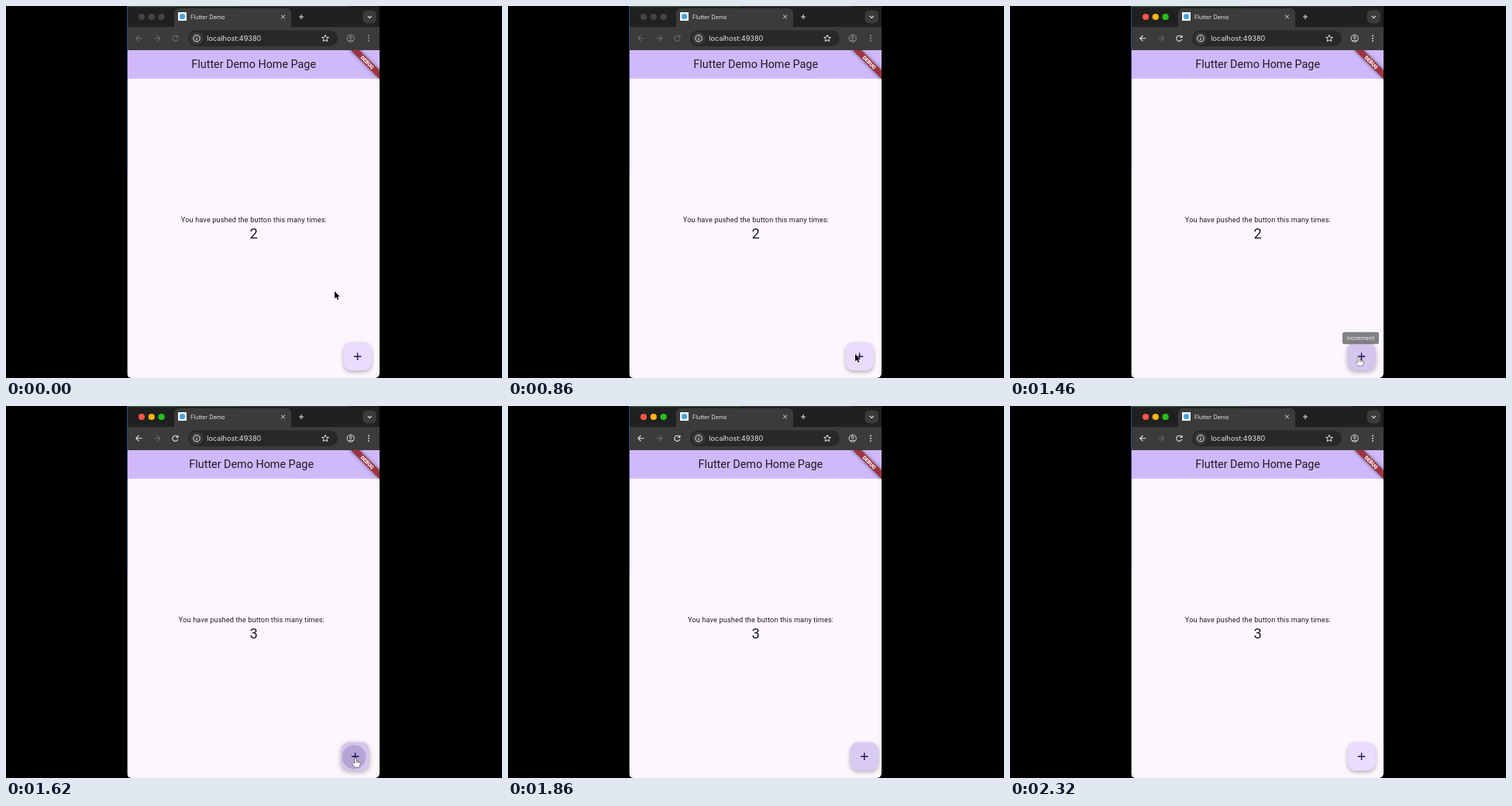
These frames come from a looping animation (640x480 px, 2340 ms). An HTML page with a canvas:

```html
<!DOCTYPE html>
<html lang="en">
<head>
<meta charset="utf-8">
<title>Counter demo</title>
<style>
  html, body { margin: 0; width: 100%; height: 100%; overflow: hidden; background: #000; }
  canvas { display: block; }
</style>
</head>
<body>
<canvas id="stage" width="640" height="480"></canvas>
<script>
const ctx = document.getElementById('stage').getContext('2d');
const LOOP = 2340, UI = 0.657, TAU = Math.PI * 2;
const INK = '#1d1b20', STRIP = '#1f2020', BAR = '#3b3b3b', PILL = '#282828';
const BRIGHT = '#e3e3e3', SOFT = '#9a9a9a', DIM = '#6a6a6a';

const ACTIVATE = 1000, PRESS = 1490, COUNT = 1550;
// Keyframes: [time, value]
const SHAKE = [[1530, 0], [1620, -3], [1860, 6.2], [2020, 6.2], [2150, 0]];
const HOVER = [[1060, 0], [1150, 1], [1780, 1], [1980, 0]];
const TOOLTIP = [[1080, 0], [1200, 0.85], [PRESS, 0.85], [PRESS + 75, 0]];
const SPLASH_SIZE = [[PRESS, 3], [1620, 15.5], [1760, 26]];
const SPLASH_FADE = [[PRESS, 0], [1540, 1], [1700, 1], [1900, 0]];
const POINTER_X = [[0, 424], [540, 447.5], [1180, 448.5], [1620, 451], [1800, 453]];
const POINTER_Y = [[0, 368], [540, 448], [1180, 450], [1620, 454], [1800, 484]];

function track(keys, t) {
  if (t <= keys[0][0]) return keys[0][1];
  for (let i = 1; i < keys.length; i++) {
    const [t0, a] = keys[i - 1], [t1, b] = keys[i];
    if (t < t1) return a + (b - a) * (1 - Math.cos(Math.PI * (t - t0) / (t1 - t0))) / 2;
  }
  return keys[keys.length - 1][1];
}

function box(x, y, w, h, r, fill) {
  ctx.beginPath();
  ctx.roundRect(x, y, w, h, r);
  ctx.fillStyle = fill;
  ctx.fill();
}

function disc(x, y, r, fill) {
  ctx.beginPath();
  ctx.arc(x, y, r, 0, TAU);
  ctx.fillStyle = fill;
  ctx.fill();
}

function stroke(d, color, width = 1, x = 0, y = 0) {
  ctx.save();
  ctx.translate(x, y);
  ctx.strokeStyle = color;
  ctx.lineWidth = width;
  ctx.stroke(new Path2D(d));
  ctx.restore();
}

function ring(x, y, r, color) {
  ctx.beginPath();
  ctx.arc(x, y, r, 0, TAU);
  ctx.strokeStyle = color;
  ctx.lineWidth = 1;
  ctx.stroke();
}

function label(text, x, y, font, color, align = 'center', spacing = 0) {
  ctx.font = font + ', sans-serif';
  ctx.letterSpacing = spacing + 'px';
  ctx.textAlign = align;
  ctx.fillStyle = color;
  ctx.fillText(text, x, y);
}

function drawTabStrip(active) {
  box(156, 0, 326, 57, 0, STRIP);
  box(156, 0, 144, 1, 0, '#41683f');
  box(300, 0, 143, 1, 0, '#49386b');
  const lights = active ? ['#ff5645', '#ffb514', '#25c21b'] : ['#444', '#444', '#444'];
  lights.forEach((color, i) => disc(175 + i * 12.8, 14, 4.1, color));

  box(156, 27, 326, 30, 0, BAR);
  box(217, 3, 151, 25, [6, 6, 0, 0], BAR);
  box(222, 8, 11, 11, 0, '#f6f8fa');
  disc(227.5, 13.5, 3.6, '#42a5dc');
  label('Flutter Demo', 238, 16.5, '7.3px Inter', BRIGHT, 'left');
  stroke('M-2.3-2.3L2.3 2.3M2.3-2.3L-2.3 2.3', BRIGHT, 1, 357.5, 13.8);
  stroke('M-3 0H3M0-3V3', BRIGHT, 1.1, 381, 14);
  box(460.5, 5.5, 17.5, 17, 6, BAR);
  stroke('M-2.5-1.2L0 1.3L2.5-1.2', BRIGHT, 1.2, 469.3, 14);
}

function drawToolbar(active) {
  const nav = active ? BRIGHT : DIM;
  const arrow = 'M4 0H-3.6M0-3.7L-3.7 0L0 3.7';
  stroke(arrow, nav, 1.1, 171.5, 41.7);
  ctx.save();
  ctx.translate(195, 41.7);
  ctx.scale(-1, 1);
  stroke(arrow, DIM, 1.1);
  ctx.restore();
  stroke('M3.3-1.5A3.6 3.6 0 1 0 3.5 1.2M3.6-4V-1.2H.8', nav, 1.1, 218.3, 41.7);

  box(235, 31.5, 193, 20.5, 10.2, PILL);
  disc(246, 41.7, 8, BAR);
  ring(246, 41.7, 4.1, BRIGHT);
  stroke('M0-2.3V-1.1M0-.3V2.4', BRIGHT, 1.1, 246, 41.7);
  label('localhost:49380', 259.3, 45, '9.1px Inter', BRIGHT, 'left');
  stroke('M0-4.3L1.3-1.4L4.4-1.2L2 .9L2.8 4L0 2.3L-2.8 4L-2 .9L-4.4-1.2L-1.3-1.4Z', BRIGHT, 1, 412, 41.7);

  const menu = active ? BRIGHT : SOFT;
  ring(444.7, 41.7, 4.6, menu);
  ring(444.7, 40.4, 1.5, menu);
  stroke('M-3 3.4Q0 .9 3 3.4', menu, 1, 444.7, 41.7);
  for (const dy of [-3.2, 0, 3.2]) disc(468, 41.7 + dy, 0.95, menu);
}

function drawBanner() {
  ctx.save();
  ctx.beginPath();
  ctx.rect(157, 57, 325, 423);
  ctx.clip();
  ctx.translate(482, 57);
  ctx.scale(UI, UI);
  ctx.rotate(Math.PI / 4);
  ctx.shadowColor = 'rgba(0,0,0,.5)';
  ctx.shadowBlur = 5;
  box(-42, 28, 84, 12, 0, '#9c3440');
  ctx.shadowBlur = 0;
  label('DEBUG', 0, 37.6, '900 10.2px Roboto', '#fff');
  ctx.restore();
}

function drawButton(t, dx) {
  const hover = track(HOVER, t);
  const mix = (a, b) => Math.round(a + (b - a) * hover);
  const x = 435.3 + dx, y = 433.8, size = 36.6;
  ctx.save();
  ctx.shadowColor = 'rgba(0,0,0,.3)';
  ctx.shadowBlur = 5 + hover;
  ctx.shadowOffsetY = 2;
  box(x, y, size, size, 10.5, `rgb(${mix(233, 212)},${mix(220, 197)},${mix(253, 236)})`);
  ctx.restore();

  const fade = track(SPLASH_FADE, t);
  if (fade > 0) {
    ctx.save();
    ctx.beginPath();
    ctx.roundRect(x, y, size, size, 10.5);
    ctx.clip();
    disc(450.5 + dx / 2, 453, track(SPLASH_SIZE, t), `rgba(165,150,200,${0.65 * fade})`);
    ctx.restore();
  }
  stroke('M-4.7 0H4.7M0-4.7V4.7', '#21105a', 1.4, 453.6 + dx, 452.3);
}

function drawTooltip(t) {
  ctx.save();
  ctx.globalAlpha = track(TOOLTIP, t);
  box(429, 420.7, 47, 15.6, 2.6, '#6e6e70');
  label('Increment', 452.5, 431.3, '7.9px Roboto', '#fff');
  ctx.restore();
}

const ARROW = new Path2D('M0 0V9.6L2.2 7.6L3.8 11L5.3 10.3L3.8 7.1H6.7Z');
const HAND = new Path2D('M-1 1Q0-.6 1 1V4.3Q2 3.6 2.8 4.6Q4 4.2 4.4 5.2Q5.8 5 5.8 6.4V8.4L4.6 11.7H-1.2L-4 7.4Q-4 5.7-2.6 6.4L-1 7.6Z');

function drawPointer(t) {
  if (t > 1800) return;
  const hand = t >= 1060;
  ctx.save();
  ctx.translate(track(POINTER_X, t), track(POINTER_Y, t));
  ctx.lineJoin = 'round';
  ctx.lineWidth = hand ? 0.9 : 1.1;
  ctx.strokeStyle = hand ? '#111' : '#fff';
  ctx.fillStyle = hand ? '#fff' : '#000';
  const shape = hand ? HAND : ARROW;
  ctx.stroke(shape);
  ctx.fill(shape);
  if (hand) stroke('M1 4.3V6.4M2.8 4.6V6.5M4.4 5.2V6.7', '#111', 0.6);
  ctx.restore();
}

function draw(t) {
  const active = t >= ACTIVATE, dx = track(SHAKE, t);
  box(0, 0, 640, 480, 0, '#000');

  ctx.save();
  ctx.beginPath();
  ctx.roundRect(156, 0, 326, 480, [0, 0, 6, 6]);
  ctx.clip();
  box(157, 57, 325, 423, 0, '#fcf7fd');
  drawTabStrip(active);
  drawToolbar(active);

  box(157, 57, 325, 36.7, 0, '#cfb9fc');
  box(156, 0, 1, 215, 0, '#2b4a78');
  box(156, 215, 1, 265, 0, '#55555c');
  label('Flutter Demo Home Page', 319.7 + dx, 80, '14.35px Roboto', INK);
  label('You have pushed the button this many times:', 319.9 + dx, 278.6, '9.15px Roboto', INK, 'center', 0.15);
  label(t < COUNT ? '2' : '3', 319.7, 300.3, '18.4px Roboto', INK);

  drawBanner();
  drawButton(t, dx);
  drawTooltip(t);
  ctx.restore();
  drawPointer(t);
}

function tick() {
  draw(performance.now() % LOOP);
  requestAnimationFrame(tick);
}
tick();
</script>
</body>
</html>
```
